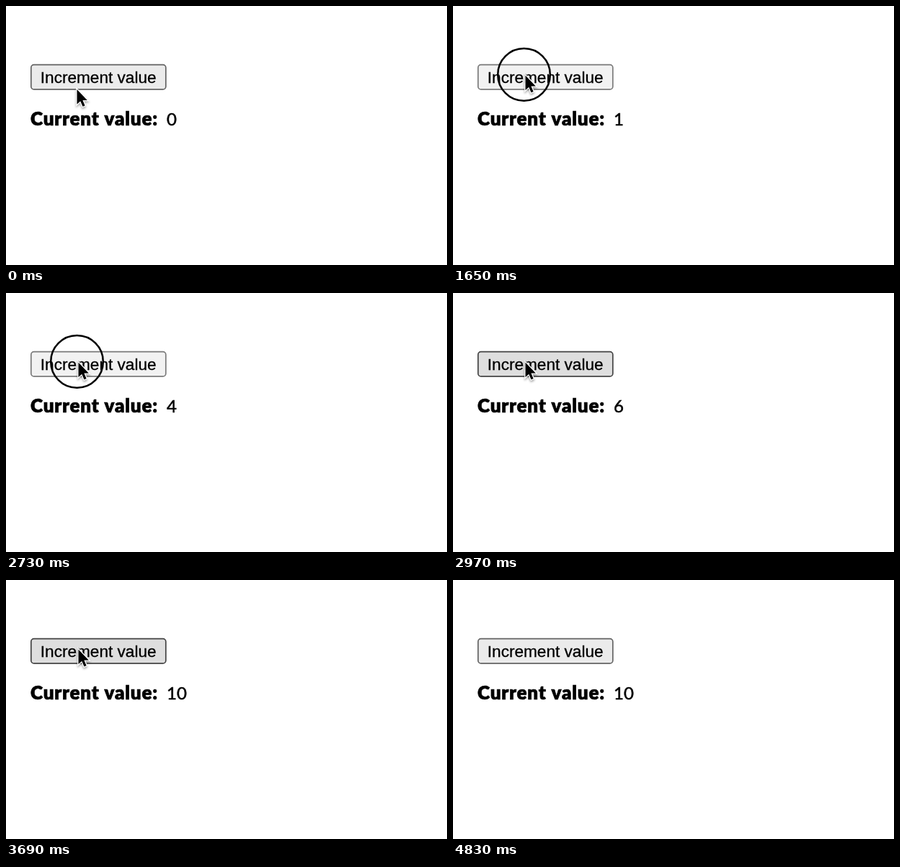
An HTML page that plays this animation: 612 by 360 pixels, repeating every 5190 ms.

```html
<!DOCTYPE html>
<html lang="en">
<head>
<meta charset="utf-8">
<title>Increment value</title>
<style>
  html, body { margin: 0; width: 100%; height: 100%; overflow: hidden; background: #fff; }
  svg { display: block; }
  text { stroke: #000; }
  .label { font: 900 26px Lato, sans-serif; letter-spacing: .8px; stroke-width: .7; }
  .value { font: 24px Lato, sans-serif; stroke-width: .5; }
  .caption { font: 22.6px "Liberation Sans", Arial, sans-serif; stroke-width: .3; }
  #button { fill: #ebebeb; stroke: #636363; stroke-width: 1.7; }
  #button.hover { fill: #dedede; stroke: #434343; }
  #button.active { fill: #f2f2f2; stroke: #7a7a7a; }
  #ring { fill: none; stroke: #000; stroke-width: 2.5; }
  #cursor { stroke: #fff; stroke-width: 2.6; paint-order: stroke;
            filter: drop-shadow(0 2px 1.5px rgba(0, 0, 0, .35)); }
</style>
</head>
<body>
<svg width="612" height="360" viewBox="0 0 612 360">
  <rect id="button" x="34.8" y="81.7" width="187" height="34.2" rx="4"/>
  <text class="caption" x="47.8" y="106.5">Increment value</text>
  <text class="label" x="34" y="166.3">Current</text>
  <text class="label" x="136.5" y="166.3">value:</text>
  <text class="value" id="value" x="223" y="166.3">0</text>
  <circle id="ring" cx="98.5" cy="95.4" r="36.3"/>
  <path id="cursor" d="M0 0V20.5L4.7 16.2L8 23.7L11.1 22.4L7.9 15H14.3Z"/>
</svg>
<script>
const LOOP = 5190, STEP = 60;
const $ = id => document.getElementById(id);

// A few slow clicks, then six in a steady rhythm
const downs = [750, 1650, 2190, 2490];
for (let i = 0; i < 6; i++) downs.push(2730 + 180 * i);

// The button is held for a fifth of the pause before the click, in whole steps
const clicks = downs.map((down, i) => {
  const pause = down - (downs[i - 1] || 0);
  return { down, up: down + Math.ceil(pause / 5 / STEP) * STEP };
});

const steps = (t, start, max) =>
  Math.max(0, Math.min(max, Math.floor((t - start) / STEP) + 1));
const bezier = (a, b, c, k) => a * (1 - k) ** 2 + 2 * b * k * (1 - k) + c * k * k;

function cursorAt(t) {
  const arrive = steps(t, 90, 5) / 5;
  const leave = (steps(t, 4470, 7) / 6) ** 2.5;
  return [
    bezier(98.5, 131, 100.5, arrive) + 237 * leave,
    bezier(116, 105, 96.5, arrive) + 185 * leave
  ];
}

function draw(t) {
  const [x, y] = cursorAt(t);
  const pressed = clicks.some(c => t >= c.down && t < c.up);
  const value = clicks.filter(c => t >= c.up).length;

  $('button').setAttribute('class', pressed ? 'active' : value && y < 117 ? 'hover' : '');
  $('ring').setAttribute('visibility', pressed ? 'visible' : 'hidden');
  $('value').textContent = value;
  $('cursor').setAttribute('transform', `translate(${x} ${y})`);
}

const start = performance.now();
function tick() {
  draw((performance.now() - start) % LOOP);
  requestAnimationFrame(tick);
}
tick();
</script>
</body>
</html>
```
